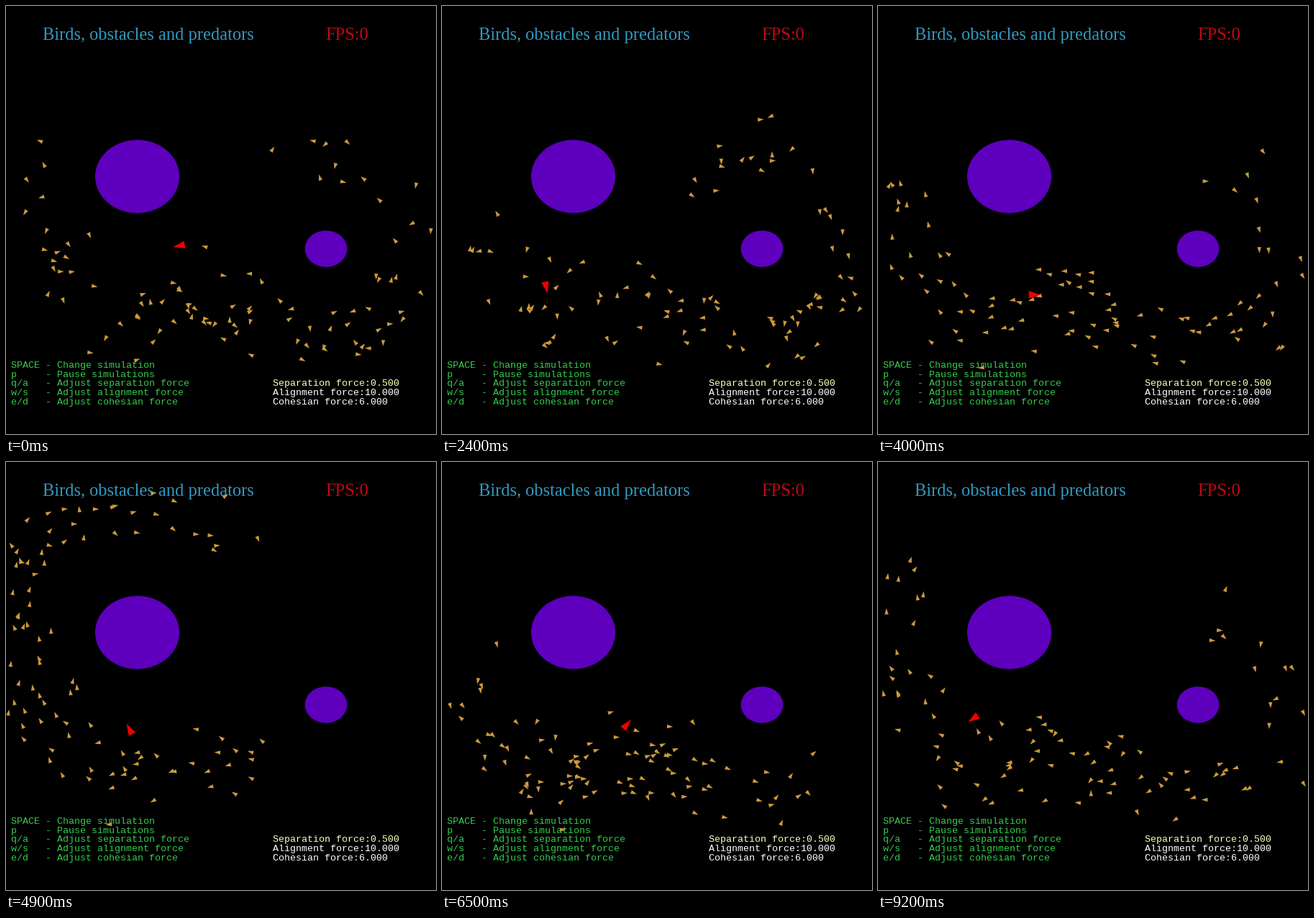
Animation, 598 px wide and 595 px high, one loop 9.3 s. Source, as a matplotlib script:

```python
import numpy as np
import matplotlib.pyplot as plt
from matplotlib.animation import FuncAnimation
from matplotlib.collections import PolyCollection
from matplotlib.patches import Ellipse

W, H = 598, 595
DPI = 64  # a power of two keeps the pixel size exact
FRAMES, INTERVAL = 93, 100
BIRDS = 97

KEYS = np.array([0, 24, 40, 49, 65, 78, 92])

# Closed track around both obstacles, and the flock's middle and reach on it
TRACK = np.array([
    (200, 75), (45, 95), (20, 220), (50, 350), (130, 440), (230, 410),
    (330, 420), (465, 465), (560, 400), (490, 220), (370, 240), (300, 100),
])
FLOCK = np.array([(5.9, 3.9), (6.5, 3.8), (5.5, 3.6), (2.6, 3.8),
                  (5.0, 2.4), (6.4, 3.8), (5.2, 4.1)])

# Predator: x, y and heading in degrees (y points down)
HUNT = np.array([
    (240.5, 333.5, 169), (145, 391.5, 78), (218, 401.5, 3),
    (171.5, 371, -118), (257.5, 364.5, -50), (70, 400, -159), (132, 357, 146),
])
HUNT_SPEED = 8

# Obstacles: centre, radii and the zone the birds keep out of
OBSTACLES = [
    ((182.5, 237), (58.5, 50.8), (76, 68)),
    ((445, 337.5), (29.3, 25.3), (72, 68)),
]


def hermite(t, pos, vel):
    """Cubic curve through the keyed values with the given velocities."""
    i = int(np.clip(np.searchsorted(KEYS, t, "right") - 1, 0, len(KEYS) - 2))
    h = KEYS[i + 1] - KEYS[i]
    s = (t - KEYS[i]) / h
    return ((2 * s**3 - 3 * s**2 + 1) * pos[i]
            + (s**3 - 2 * s**2 + s) * h * vel[i]
            + (3 * s**2 - 2 * s**3) * pos[i + 1]
            + (s**3 - s**2) * h * vel[i + 1])


def bounce(v, low, high):
    """Fold values back from the borders."""
    span = high - low
    return high - np.abs((v - low) % (2 * span) - span)


def avoid(p):
    for centre, _, zone in OBSTACLES:
        d = (p - centre) / zone
        dist = np.hypot(d[:, 0], d[:, 1])[:, None] + 1e-9
        away = np.where(dist < 1.5, 1 + dist / 3, dist)
        p = centre + d / dist * away * zone
    return p


def on_track(u):
    stops = np.arange(len(TRACK))
    return np.column_stack([np.interp(u, stops, axis, period=len(TRACK))
                            for axis in TRACK.T])


rng = np.random.default_rng(12)
place = np.linspace(-1, 1, BIRDS)
place = 0.7 * place + 0.3 * place**3  # denser in the middle
flock_vel = np.gradient(FLOCK, KEYS, axis=0)
radius = rng.rayleigh(30, BIRDS)
phase = rng.uniform(0, 2 * np.pi, BIRDS)
spin = rng.uniform(0.1, 0.25, BIRDS) * rng.choice([-1, 1], BIRDS)

hunt_angle = np.radians(HUNT[:, 2])
hunt_vel = HUNT_SPEED * np.column_stack([np.cos(hunt_angle), np.sin(hunt_angle)])


def birds_at(t):
    middle, reach = hermite(t, FLOCK, flock_vel)
    a = phase + spin * t
    circle = radius[:, None] * np.column_stack([np.cos(a), np.sin(a)])
    p = avoid(on_track(middle + reach * place) + circle)
    return np.column_stack([bounce(p[:, 0], 2, 594), bounce(p[:, 1], 42, 568)])


def predator_at(t):
    return hermite(t, HUNT[:, :2], hunt_vel)[None, :]


def darts(path, t, length, width):
    """Triangles centred on the path and pointing along it."""
    p = path(t)
    step = path(t + 0.2) - path(t - 0.2)
    f = step / (np.hypot(step[:, 0], step[:, 1])[:, None] + 1e-9)
    side = f[:, ::-1] * (-1, 1) * width / 2
    f = f * length / 2
    return np.stack([p + f, p - f + side, p - f - side], axis=1)


fig = plt.figure(figsize=(W / DPI, H / DPI), dpi=DPI, facecolor="black")
ax = fig.add_axes([0, 0, 1, 1])
ax.set_xlim(0, W)
ax.set_ylim(H, 0)
ax.axis("off")


def label(x, y, text, color, px, font):
    ax.text(x, y, text, color=color, fontsize=px * 72 / DPI, family=font,
            va="baseline", ha="left", zorder=2)


for centre, (rx, ry), _ in OBSTACLES:
    ax.add_patch(Ellipse(centre, 2 * rx, 2 * ry, facecolor="#5e00be",
                         edgecolor="none", zorder=1))

label(51, 47, "Birds, obstacles and predators", "#3399bf", 24.55, "Liberation Serif")
label(444.5, 47, "FPS:0", "#bf0a14", 24.55, "Liberation Serif")

HELP = [("SPACE", "Change simulation"), ("p", "Pause simulations"),
        ("q/a", "Adjust separation force"), ("w/s", "Adjust alignment force"),
        ("e/d", "Adjust cohesian force")]
ROWS = [503, 516, 528, 541, 554]
for y, (key, action) in zip(ROWS, HELP):
    label(7, y, f"{key:<5} - {action}", "#33cc4c", 13.33, "Liberation Mono")

FORCES = [("Separation force:0.500", "#ffffb8"),
          ("Alignment force:10.000", "white"), ("Cohesian force:6.000", "white")]
for y, (text, color) in zip(ROWS[2:], FORCES):
    label(371, y, text, color, 13.33, "Liberation Mono")

predator = PolyCollection([], facecolors="#ee0000", edgecolors="none",
                          linewidths=0, zorder=3)
birds = PolyCollection([], facecolors="#cc9a3c", edgecolors="none",
                       linewidths=0, zorder=4)
ax.add_collection(predator, autolim=False)
ax.add_collection(birds, autolim=False)


def draw(frame):
    predator.set_verts(darts(predator_at, frame, 16.5, 10.5))
    birds.set_verts(darts(birds_at, frame, 8.5, 5.5))
    return predator, birds


anim = FuncAnimation(fig, draw, frames=FRAMES, interval=INTERVAL,
                     repeat=True, repeat_delay=0)
plt.show()
```
